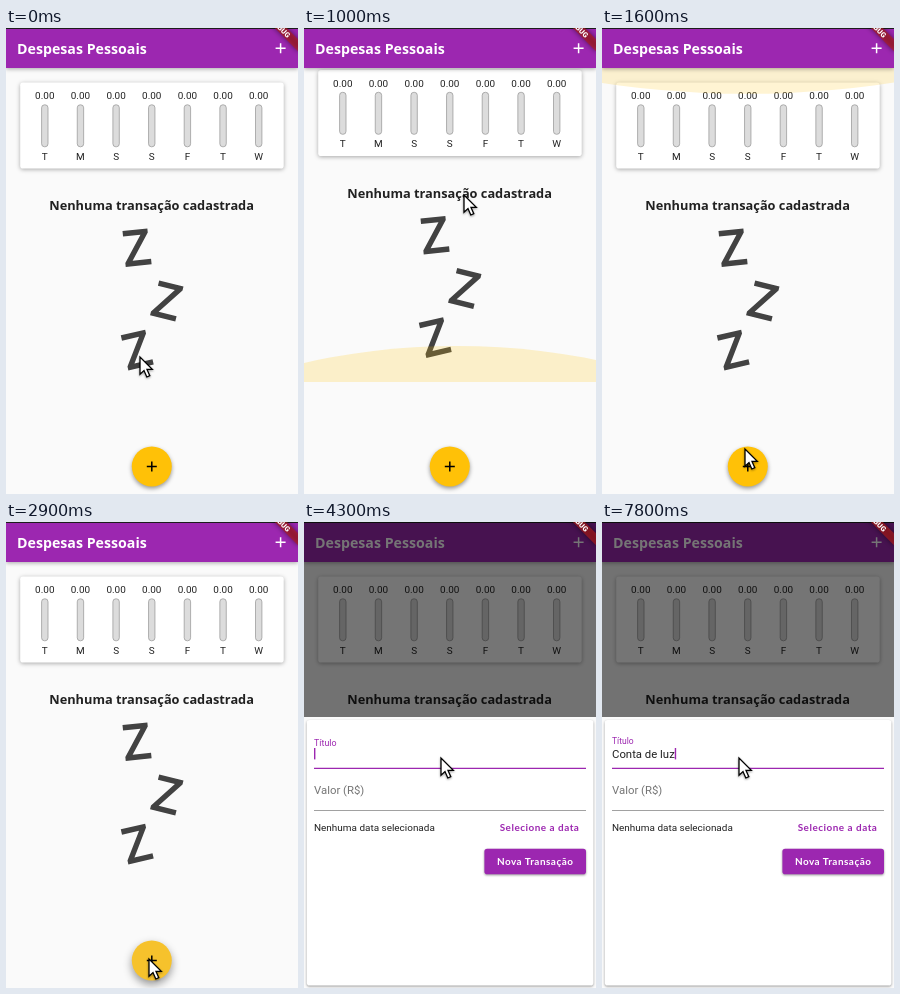
These frames come from a looping animation (292 by 466 pixels, 8000 ms). An HTML page:

```html
<!DOCTYPE html>
<html lang="pt">
<head>
<meta charset="utf-8">
<title>Despesas Pessoais</title>
<style>
html, body { margin: 0; width: 100%; height: 100%; overflow: hidden; background: #fafafa; }
svg { display: block; width: 292px; height: 466px; }
text { font-family: Roboto, sans-serif; font-size: 9.95px; fill: #212121; }
.open { font-family: "Open Sans", sans-serif; font-weight: 700; }
.btn { font-family: Lato, sans-serif; font-weight: 700; letter-spacing: .5px; }
.field { font-size: 11.37px; }
.mid { text-anchor: middle; }
.low { filter: drop-shadow(0 1px 1px #0006); }
.high { filter: drop-shadow(.7px 1.8px 2px #0005); }
</style>
</head>
<body>
<svg viewBox="0 0 292 466">
  <defs>
    <path id="z" fill="#424242" d="M-12.5-18H12.5V-14L-5.5 12.5H13V18H-13V14L5-12.5H-12.5Z"/>
    <path id="plus" d="M-5 0H5M0-5V5" fill="none" stroke-width="1.5"/>
    <clipPath id="list"><rect y="40" width="292" height="314"/></clipPath>
  </defs>
  <rect width="292" height="466" fill="#fafafa"/>

  <g clip-path="url(#list)">
    <g id="content">
      <rect class="high" x="14.2" y="54.5" width="263.5" height="86" rx="2.8" fill="#fff"/>
      <g id="chart"></g>
      <text class="open mid" x="145.6" y="182" style="font-size:12.79px">Nenhuma transação cadastrada</text>
      <use href="#z" transform="translate(130.8 219.7) rotate(-6)"/>
      <use href="#z" transform="translate(161 273) rotate(14)"/>
      <use href="#z" transform="translate(131 322) rotate(-13)"/>
    </g>
    <ellipse id="topGlow" rx="438" fill="#ffc107"/>
    <ellipse id="endGlow" rx="438" fill="#ffc107"/>
  </g>

  <rect class="high" width="292" height="40" fill="#9c27b0"/>
  <rect width="292" height="1" fill="#1c1c1c"/>
  <text class="open" x="11" y="25.7" style="font-size:14.2px;fill:#fff">Despesas Pessoais</text>
  <use href="#plus" x="274.6" y="20.3" stroke="#fff"/>

  <circle id="fab" cx="145.8" cy="438.5" r="20"/>
  <use href="#plus" x="145.8" y="438.5" stroke="#000"/>

  <g id="modal">
    <rect width="292" height="466" fill="#000" opacity=".54"/>
    <rect y="195" width="292" height="271" fill="#fafafa"/>
    <rect class="low" x="2.8" y="198" width="286.6" height="265.5" rx="2.8" fill="#fff"/>
    <text id="label" x="10">Título</text>
    <text id="typed" class="field" x="10" y="235.5"></text>
    <rect id="caret" y="226" width="1.4" height="11.4" fill="#9c27b0"/>
    <path id="line" d="M10 246.4H282"/>
    <text class="field" x="10" y="271.7" style="fill:#757575">Valor (R$)</text>
    <path d="M10 288.5H282" stroke="#8a8a8a" stroke-width=".8"/>
    <text x="10" y="309.3">Nenhuma data selecionada</text>
    <text class="btn" x="195.7" y="309.3" style="fill:#9c27b0">Selecione a data</text>
    <rect class="low" x="180.4" y="326.8" width="101.6" height="25.4" rx="2.8" fill="#9c27b0"/>
    <text class="btn mid" x="231.2" y="343.2" style="fill:#fff">Nova Transação</text>
  </g>

  <g transform="translate(292 -17) rotate(45)">
    <rect x="-28.4" y="19.9" width="56.8" height="8.5" opacity=".5" style="filter:blur(2.5px)"/>
    <rect x="-28.4" y="19.9" width="56.8" height="8.5" fill="#b71c1c" opacity=".63"/>
    <text class="mid" y="26.8" style="font-size:7.25px;font-weight:900;fill:#fff">DEBUG</text>
  </g>

  <path id="cursor" class="low" d="M0 0V17.2L4 13.5 6.8 20 9.8 18.7 7 12.4H12.3Z" fill="#fff" stroke="#000" stroke-width="1.3"/>
</svg>
<script>
const $ = id => document.getElementById(id);
const set = (id, attrs) => { for (const k in attrs) $(id).setAttribute(k, attrs[k]); };
const smooth = p => p * p * (3 - 2 * p);

// Value at t from keys [time, value], eased between neighbours.
function track(keys, t, ease = p => p) {
  const i = keys.findIndex(k => k[0] > t);
  if (i === 0) return keys[0][1];
  if (i < 0) return keys[keys.length - 1][1];
  const [t0, a] = keys[i - 1], [t1, b] = keys[i];
  return a + (b - a) * ease((t - t0) / (t1 - t0));
}

$('chart').innerHTML = [...'TMSSFTW'].map((day, i) => {
  const x = 38.8 + 35.65 * i;
  return `<text class="mid" x="${x}" y="71">0.00</text>
    <rect x="${x - 3.2}" y="76.8" width="6.4" height="42" rx="3" fill="#dcdcdc" stroke="#9e9e9e" stroke-width=".8"/>
    <text class="mid" x="${x}" y="131.7">${day}</text>`;
}).join('');

const cursorX = [[0, 134], [1000, 160], [1600, 143], [3100, 143], [3900, 137]];
const cursorY = [[0, 329], [1000, 167], [1600, 421], [1800, 437], [3100, 437], [3900, 236]];
const scroll = [[100, 0], [400, 12.5], [1000, 12.5], [1200, 0]];
const endPull = [[300, 0], [1000, .613], [1100, .55], [1500, 0]];
const topPull = [[1150, 0], [1400, .66], [1600, .44], [1800, .13], [1900, 0]];
const keyTimes = [5500, 5700, 5800, 6100, 6300, 6400, 6600, 6700, 6900, 7200, 7400, 7800];
const phrase = 'Conta de luz';

// Overscroll glow: a wide circle squashed against the edge at y.
function glow(id, pull, y, dir, x) {
  set(id, {
    cx: 73 + x / 2, cy: y - dir * 379.3 * pull, ry: 438 * pull,
    opacity: pull ? Math.min(.2, .08 + pull * .22) : 0
  });
}

function draw(t) {
  const x = track(cursorX, t, smooth), y = track(cursorY, t, smooth);
  const bulge = t > 3100 && t < 3900 ? 9 * Math.sin(Math.PI * (t - 3100) / 800) : 0;
  set('cursor', { transform: `translate(${x + bulge} ${y})` });
  set('content', { transform: `translate(0 ${-track(scroll, t)})` });
  glow('topGlow', track(topPull, t), 40, 1, x);
  glow('endGlow', track(endPull, t), 354, -1, x);

  const hover = track([[2100, 0], [2300, 1]], t);
  set('fab', {
    fill: `rgb(${255 - 9 * hover},${193 + hover},${7 + 37 * hover})`,
    style: `filter:drop-shadow(0 ${2 + 2 * hover}px ${2 + 2 * hover}px #0006)`
  });

  set('modal', { visibility: t < 3000 ? 'hidden' : 'visible' });
  const focused = t >= 4300;
  const lift = focused ? Math.min(1, .88 + (t - 4300) * .0012) : 0;
  set('label', {
    y: 235 - 13 * lift,
    style: `font-size:${11.37 - 2.84 * lift}px;fill:${focused ? '#9c27b0' : '#757575'}`
  });
  set('line', focused ? { stroke: '#9c27b0', 'stroke-width': 1.4 } : { stroke: '#8a8a8a', 'stroke-width': .8 });

  const text = phrase.slice(0, keyTimes.filter(k => k <= t).length);
  const shown = text.replace(/ /g, '\u00a0');
  if ($('typed').textContent !== shown) $('typed').textContent = shown;
  const lit = focused && (t < 4700 || t >= 5200);
  set('caret', { x: 10 + (text ? $('typed').getComputedTextLength() : 0), opacity: lit ? 1 : 0 });
}

// The screen refreshes ten times a second.
const start = performance.now();
function tick() {
  draw(Math.floor((performance.now() - start) % 8000 / 100) * 100);
  requestAnimationFrame(tick);
}
tick();
</script>
</body>
</html>
```
